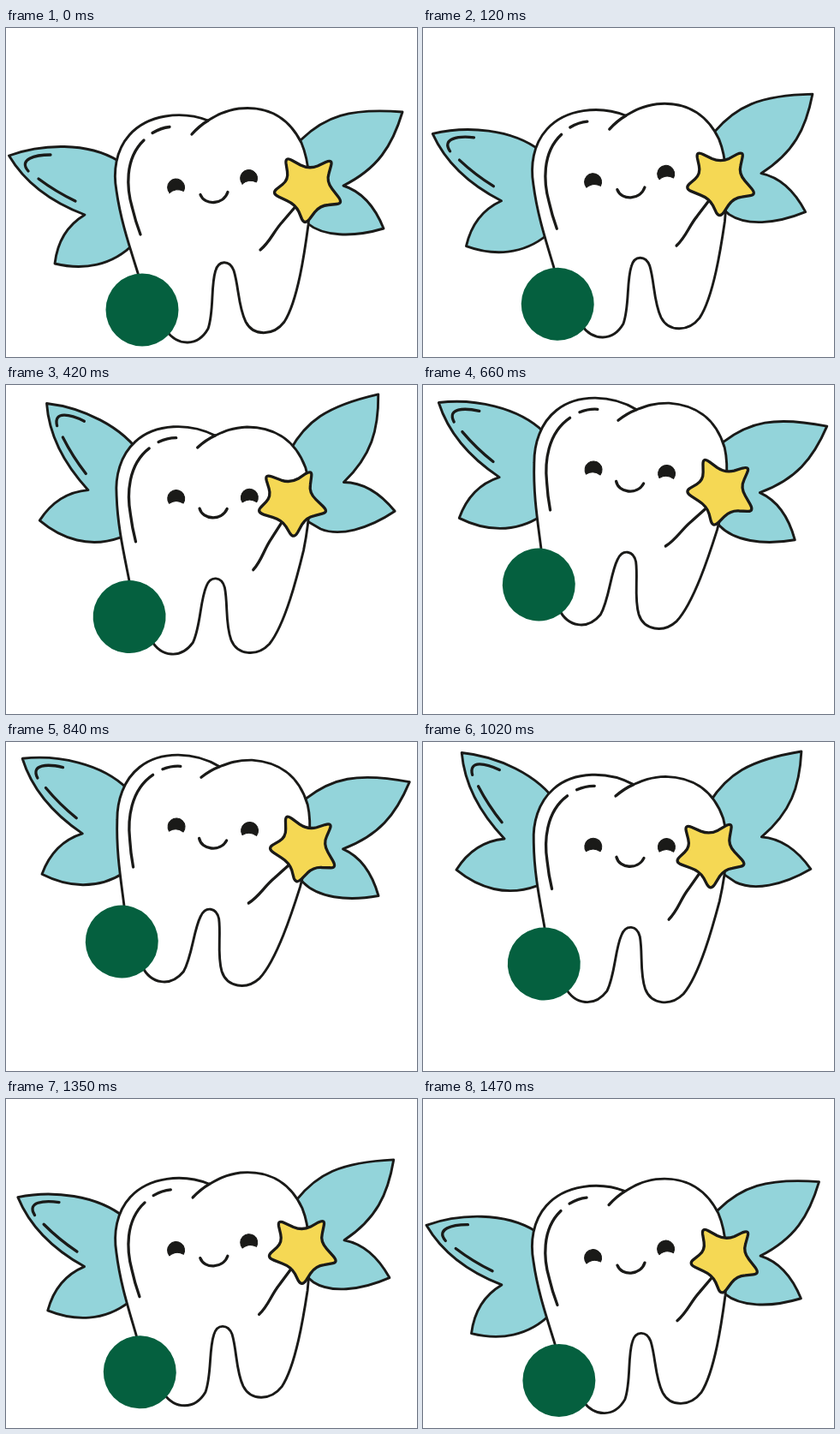
An HTML page that plays this animation: 480x384 px, repeating every 1.5 s.

```html
<!DOCTYPE html>
<html lang="en">
<head>
<meta charset="utf-8">
<title>Tooth fairy</title>
<style>
  html, body { margin: 0; width: 100%; height: 100%; overflow: hidden; background: #fff; }
  svg { display: block; width: 480px; height: 384px; }
  path { stroke: #1a1a18; stroke-width: 2.9; stroke-linecap: round; stroke-linejoin: round; }
  .wing { fill: #93d4da; }
  .skin { fill: #fff; }
  .line { fill: none; stroke-width: 3.3; }
  .eye { fill: #1a1a18; stroke-width: 1; }
  .star { fill: #f5d854; stroke-width: 3.3; }
  .badge { fill: #05603f; }
</style>
</head>
<body>
<svg viewBox="0 0 480 384">
  <g id="fairy">
    <g id="left">
      <path class="wing" d="M3.5 149 C42 135 95 133 131 155 L180 212 L150 251 C124 278 90 283 57 275
        C60 249 72 230 92 218 C55 204 23 182 3.5 149Z"/>
      <path class="line" d="M52 148 C34 148 14 153 26 167 M38 176 Q58 191 81 202"/>
    </g>
    <g id="right">
      <path class="wing" d="M463 98 C400 93 372 104 345 130 L301 172 L352 228 C370 243 404 245 441 234
        C431 209 416 191 394 184 C434 164 451 138 463 98Z"/>
    </g>
    <path class="skin" d="M236 108 C205 96 165 101 144 125 C128 143 125 168 129 190 C134 225 144 254 154 286
      C161 320 175 340 187 353 C201 372 224 372 236 351 C243 331 239 302 244.500 284
      C248 270.500 261 270.500 266 283 C272 302 271 325 280 343 C289 360 312 360 325 343
      C341 318 349 260 353 230 C356 197 356 160 345 134 C328 100 300 91 272 94
      C254 97 246 102 236 108Z"/>
    <path class="line" d="M217 124 Q226 114 236 108 M171 122.500 Q181 116.500 191 115.500
      M161 131 C138 153 141 188 147.500 210 Q151 225 157 241
      M227 194.500 C232 207.500 254 206.500 259 191.500"/>
    <path class="eye" d="M191 192.500 A10 10 0 1 1 207.500 190.500 Q198.500 186 191 192.500Z"/>
    <path class="eye" d="M276 182 A10 10 0 1 1 292.500 180 Q283.500 175.500 276 182Z"/>
    <g id="wand">
      <path class="line" d="M297 259 C309 249 312 238 323 226 L341 205"/>
      <path class="star" d="M327 158 Q326 150 334 154.500 L344 160 Q354 165 364 161 L373.500 156.500
        Q382 153 379.500 161 L377 170 Q374 179 381 188 L388 197 Q394 205 386 205.500 L376.500 206.500
        Q367 207 360.500 215 L354.500 223 Q349 230 345.500 223 L342 214.500 Q338 206 328 201.500
        L318.500 197 Q310 193 316 188 L323 182.500 Q330 177 328.500 167.500Z"/>
    </g>
    <circle class="badge" cx="159" cy="329" r="42.500"/>
  </g>
</svg>
<script>
  const LOOP = 1500, BEAT = 750, STEP = 30;
  const [fairy, left, right, wand] = ['fairy', 'left', 'right', 'wand'].map(id => document.getElementById(id));

  const ease = x => x * x * (3 - 2 * x);

  // 0 -> 1 at the peak -> 0 at the end of the period
  const swing = (t, peak, period) => ease(t < peak ? t / peak : (period - t) / (period - peak));

  const pose = (el, angle, x, y, dx = 0, dy = 0) =>
    el.setAttribute('transform', `translate(${dx} ${dy}) rotate(${angle} ${x} ${y})`);

  function draw(now) {
    const t = Math.floor(now % LOOP / STEP) * STEP;
    const rise = swing(t, BEAT, LOOP);
    const flap = swing(t % BEAT, 360, BEAT);
    pose(fairy, 10.4 * rise, 241.5, 179.5, rise, -82.7 * rise);
    pose(left, 21.7 * flap, 180, 212);
    pose(right, -25 * flap, 301, 172);
    pose(wand, -15.2 * flap, 297, 259);
  }

  function tick() {
    draw(performance.now());
    requestAnimationFrame(tick);
  }

  draw(0);
  requestAnimationFrame(tick);
</script>
</body>
</html>
```
